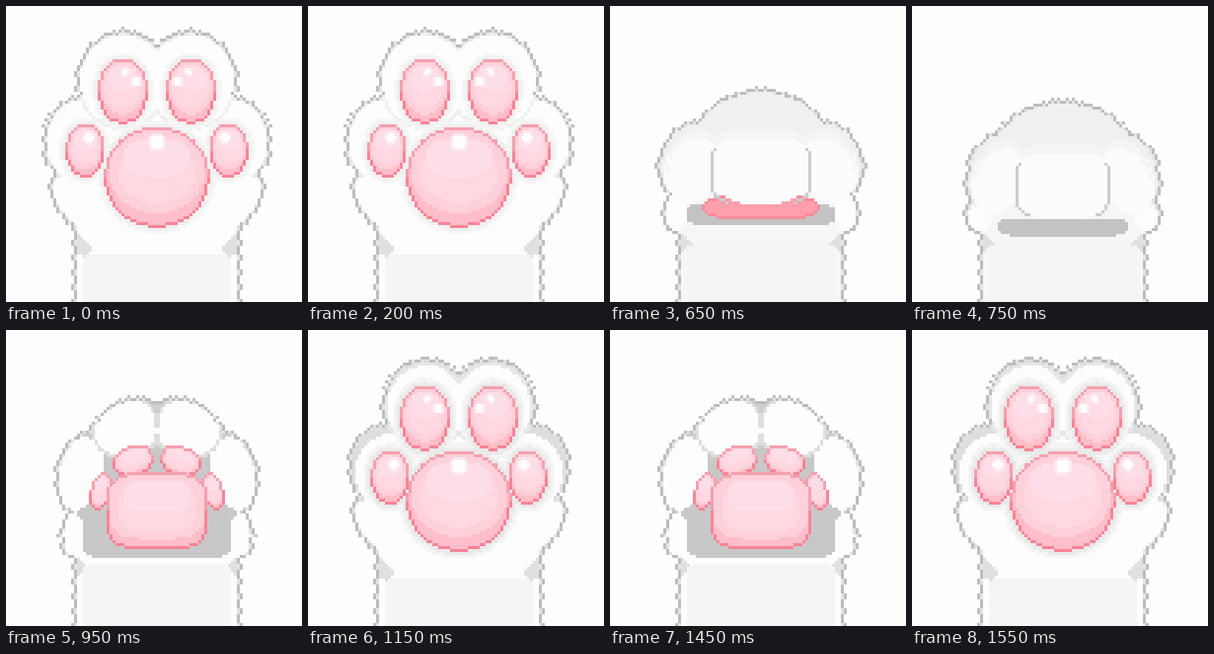
An HTML page with a canvas for the animation above (1.6 s loop, 400x400 px).

```html
<!DOCTYPE html>
<html lang="en">
<head>
<meta charset="utf-8">
<title>Paw</title>
<style>
html, body { margin: 0; width: 100%; height: 100%; overflow: hidden; background: #fdfefd; }
canvas { display: block; width: 400px; height: 400px; image-rendering: pixelated; }
</style>
</head>
<body>
<canvas id="stage" width="100" height="100"></canvas>
<script>
const N = 100, LOOP = 1600, TICK = 50, MID = 204;
const stage = document.getElementById('stage').getContext('2d');
const pen = Object.assign(document.createElement('canvas'), { width: N, height: N })
  .getContext('2d', { willReadFrequently: true });
let image;

// Blobs are [x, y, rx, ry, rotation, squareness], drawn for the left half and mirrored.
const grow = ([x, y, rx, ry, ...rest], k) => [x, y, rx + k, ry + k, ...rest];
const move = ([x, y, ...rest], dx, dy) => [x + dx, y + dy, ...rest];

const ARM = [MID, 420, 111, 150, 0, 20];
const PALM = [MID, 235, 107, 74, 0, 6];
const OPEN = {
  hand: [MID, 230, 110, 100, 0, 2.6], thumb: [108, 272, 56, 28, 0.75],
  upBack: [158, 100, 62, 66, 0.1], outBack: [105, 183, 55, 62],
  up: [158, 101, 58, 62, 0.1], out: [107, 184, 52, 58],
  padUp: [158, 115, 33, 44, 0, 2.2], padOut: [107, 195, 26, 36, 0, 2.2], padBig: [MID, 231, 70, 67, 0, 2.1],
  back: 238, palm: 253, glow: 240, halo: 8, shine: 1, cuff: 336
};
const NEAR = {
  ...OPEN,
  upBack: move(grow(OPEN.upBack, -4), 1, 0), outBack: move(grow(OPEN.outBack, -3), 2, 2),
  up: move(grow(OPEN.up, -6), 1, 3), out: move(grow(OPEN.out, -6), 3, 9),
  padUp: move(OPEN.padUp, 0, 4), padOut: move(OPEN.padOut, 4, 4),
  back: 222, glow: 234, halo: 10
};
const HALF = {
  hand: [MID, 240, 110, 78, 0, 2.6], thumb: [91, 277, 14, 29, 0, 2.2],
  upBack: [178, 150, 64, 58], outBack: [112, 194, 43, 61, 0.3],
  up: [161, 132, 41, 37, -0.1, 2.5], out: [100, 194, 29, 50, 0.25, 2.3],
  padUp: [172, 177, 28, 20, -0.3, 2.3], padOut: [128, 218, 14, 26, 0.3, 2.3], padBig: [MID, 245, 69, 52, 0, 3.6],
  back: 205, palm: 200, glow: 203, halo: 0, shine: 0, cuff: 318
};
const FOLD = {
  dome: [MID, 191, 94, 77], cheek: [113, 210, 46, 56, 0.35], thumb: [89, 280, 15, 25],
  seam: [MID, 224, 69, 44, 0, 4], gap: [MID, 282, 101, 12, 0, 12], pink: [MID, 272, 78, 17, 0, 3]
};
const FIST = {
  dome: [MID, 209, 100, 80], cheek: [117, 224, 42, 57, 0.35], thumb: [91, 285, 16, 21],
  seam: [MID, 244, 65, 45, 0, 3.2], gap: [MID, 299, 88, 12, 0, 4], pink: [MID, 270, 50, 12, 0, 3]
};

const lerp = (a, b, k) => a + (b - a) * k;
const full = ([x, y, rx, ry, rot = 0, n = 2]) => [x, y, rx, ry, rot, n];
function mix(a, b, k) {
  return Object.fromEntries(Object.keys(a).map(key => {
    if (typeof a[key] === 'number') return [key, lerp(a[key], b[key], k)];
    const to = full(b[key]);
    return [key, full(a[key]).map((v, i) => lerp(v, to[i], k))];
  }));
}
const gray = v => [v, v, v];

function poly(pts) {
  pen.beginPath();
  pts.forEach(p => pen.lineTo(...p));
  pen.fill();
}
function blob(b) {
  const [x, y, rx, ry, rot, n] = full(b);
  const bend = v => Math.sign(v) * Math.abs(v) ** (2 / n);
  const c = Math.cos(rot), s = Math.sin(rot), pts = [];
  for (let i = 0; i < 64; i++) {
    const a = i / 32 * Math.PI, u = rx * bend(Math.cos(a)), v = ry * bend(Math.sin(a));
    pts.push([x + u * c - v * s, y + u * s + v * c]);
  }
  poly(pts);
}

// Rasterises a shape and its mirror image to hard-edged cells.
function mask(draw) {
  pen.setTransform(1, 0, 0, 1, 0, 0);
  pen.clearRect(0, 0, N, N);
  for (const s of [1, -1]) {
    pen.setTransform(s / 4, 0, 0, 1 / 4, s > 0 ? 0 : MID / 2, 0);
    draw();
  }
  const px = pen.getImageData(0, 0, N, N).data;
  return Uint8Array.from({ length: N * N }, (_, i) => px[i * 4 + 3] > 127 ? 1 : 0);
}
const blobs = (...list) => mask(() => list.forEach(blob));
const both = (a, b) => a.map((v, i) => v & b[i]);
const edge = m => m.map((v, i) => {
  const y = i / N | 0;
  return v && !(m[i - 1] && m[i + 1] && (y === 0 || m[i - N]) && (y === N - 1 || m[i + N])) ? 1 : 0;
});
const dot = (i, color) => image.data.set([...color, 255], i * 4);
const paint = (m, color) => m.forEach((v, i) => v && dot(i, color));
const shape = (b, color, clip) => paint(clip ? both(blobs(b), clip) : blobs(b), color);

// Fur outline: gray cells, with small tufts sticking out at regular gaps.
function furEdge(m) {
  edge(m).forEach((v, i) => {
    if (!v) return;
    const x = i % N, y = i / N | 0, side = x < 51 ? -1 : 1;
    const tuft = (Math.abs(2 * x - 101) + 4 * y) % 5 < 2;
    const out = m[i + side] ? i - N : i + side;
    if (tuft && !m[out]) {
      dot(out, gray(190));
      dot(i, gray(228));
    } else dot(i, gray(188));
  });
}

function cuff(y) {
  paint(mask(() => poly([[95, 306], [117, 326], [108, y + 3], [95, 334]])), gray(224));
  shape([MID, y + 100, 100, 100, 0, 20], gray(245));
}

function pad(b, shine, spots, slide) {
  const [x, y, rx, ry, rot, n] = b;
  const m = blobs(b);
  const part = (dy, kx, ky, color) => shape([x + slide, y + dy * ry, rx * kx, ry * ky, rot, n], color, m);
  paint(m, [255, 190, 201]);
  part(-0.14, 0.92, 0.85, [254, 208, 218]);
  part(-0.1, 0.74, 0.62, [255, 216, 225]);
  part(-0.4, 0.64, 0.4, [253, 222, 232]);
  for (const [dx, dy, r] of spots) {
    for (const [k, color] of [[1.4, [254, 234, 241]], [0.9, [255, 254, 255]]]) {
      if (shine > 0.3) shape([x + dx + slide, y + dy, r * k * shine, r * k * shine], color, m);
    }
  }
  edge(m).forEach((v, i) => v && dot(i, i / N * 4 < y ? [244, 160, 174] : [248, 132, 150]));
}

function drawOpen(p, slide) {
  const all = blobs(ARM, p.hand, grow(p.thumb, 3), p.upBack, p.outBack);
  paint(all, gray(p.back));
  paint(both(blobs(ARM, p.hand), all), gray(253));
  cuff(p.cuff);
  shape(PALM, gray(p.palm), all);
  shape(p.thumb, gray(253), all);
  shape(p.out, gray(253), all);
  shape(grow(p.up, 4), gray((p.back + 240) / 2), all);
  shape(p.up, gray(253), all);
  if (p.halo > 3) {
    for (const k of [1, 0.5]) {
      const halos = [p.padOut, p.padUp, p.padBig].map(b => grow(b, p.halo * k));
      paint(both(blobs(...halos), all), gray(lerp(p.glow, 253, k - 0.5)));
    }
  }
  pad(p.padOut, p.shine, [[5, -17, 7]], slide);
  pad(p.padUp, p.shine, [[3, -26, 5], [18, -13, 6]], slide);
  pad(p.padBig, p.shine, [[0, -47, 9]], slide);
  furEdge(all);
}

function drawFist(p) {
  const head = blobs(p.dome, p.cheek);
  const all = blobs(ARM, [MID, 300, 104, 60, 0, 4], grow(p.thumb, 3), p.dome, p.cheek);
  paint(all, gray(246));
  cuff(322);
  shape(p.thumb, gray(253), all);
  shape(p.gap, gray(195));
  shape(p.cheek, gray(240), all);
  shape(move(grow(p.cheek, -7), 0, 9), gray(250), all);
  shape(p.pink, [255, 158, 172]);
  paint(edge(blobs(p.pink)), [248, 140, 155]);
  shape(p.dome, gray(240), all);
  for (const [k, v] of [[-12, 245], [0, 252]]) {
    paint(both(blobs(move(p.seam, 0, k), move(grow(p.cheek, -10), 2, 14 + k)), head), gray(v));
  }
  const [, y, rx] = p.seam;
  edge(blobs(p.seam)).forEach((v, i) => {
    const low = i / N * 4 > y - 32, far = Math.abs(i % N * 4 + 2 - MID) > rx * 0.65;
    if (v && low && far) dot(i, gray(204));
  });
  furEdge(all);
}

// How tightly the paw is closed: 0 open, 1 near, 2 half, 3 fold, 4 fist.
const KEYS = [
  [0, 0], [350, 0], [400, 0.5], [450, 0.5], [500, 1], [600, 2], [650, 3], [750, 4], [800, 4], [850, 3],
  [950, 2], [1050, 1], [1100, 0], [1150, 1], [1250, 2], [1350, 4], [1450, 2], [1550, 1], [LOOP, 0]
];
function grip(t) {
  const i = KEYS.findIndex(k => k[0] > t), [t0, a] = KEYS[i - 1], [t1, b] = KEYS[i];
  return lerp(a, b, (t - t0) / (t1 - t0));
}

const cache = new Map();
function render(t) {
  const g = grip(t), slide = 8 * Math.max(0, 1 - Math.abs(t - 100) / 100);
  const key = g + ':' + slide;
  if (!cache.has(key)) {
    image = stage.createImageData(N, N);
    for (let i = 0; i < N * N; i++) dot(i, [253, 254, 253]);
    if (g > 2) drawFist(mix(FOLD, FIST, g - 3));
    else drawOpen(g > 1 ? mix(NEAR, HALF, g - 1) : mix(OPEN, NEAR, g), slide);
    cache.set(key, image);
  }
  return cache.get(key);
}
for (let t = 0; t < LOOP; t += TICK) render(t);

const begin = performance.now();
function tick() {
  const t = (performance.now() - begin) % LOOP;
  stage.putImageData(render(t - t % TICK), 0, 0);
  requestAnimationFrame(tick);
}
tick();
</script>
</body>
</html>
```
